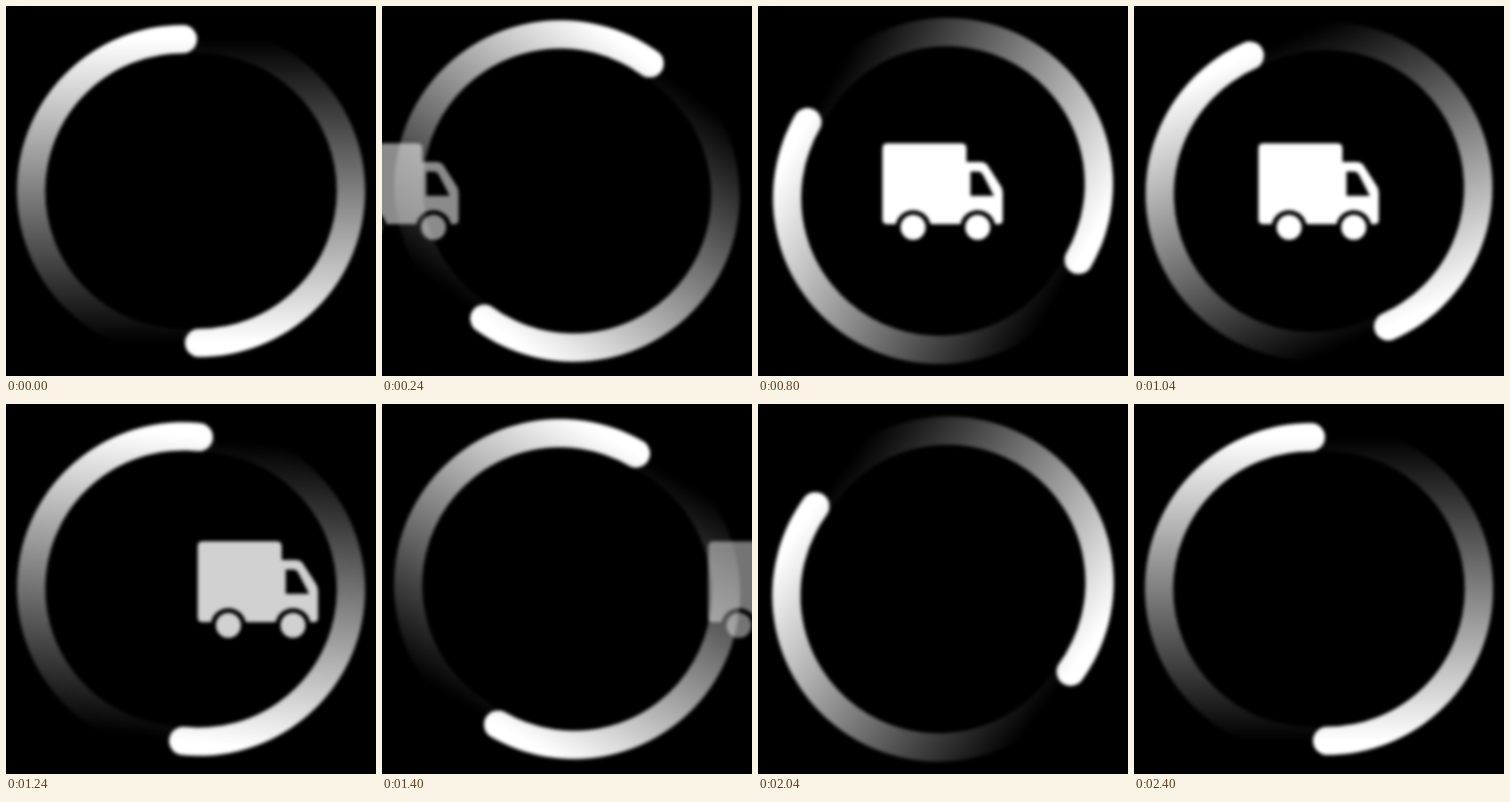
Animation of 458x458 px, one loop 2.44 s. Source, as an HTML page:

```html
<!DOCTYPE html>
<html lang="en">
<head>
<meta charset="utf-8">
<title>Delivery loader</title>
<style>
  html, body { margin: 0; height: 100%; overflow: hidden; background: #000; }
  svg { display: block; width: 100vw; height: 100vh; }
</style>
</head>
<body>
<svg viewBox="0 0 458 458">
  <defs>
    <linearGradient id="fade" gradientUnits="userSpaceOnUse" x1="0" y1="41" x2="0" y2="417">
      <stop stop-color="#fff"/>
      <stop offset="1" stop-color="#fff" stop-opacity="0"/>
    </linearGradient>
    <filter id="soft"><feGaussianBlur stdDeviation="2.3"/></filter>
    <path id="arc" d="M219 41A188 188 0 0 0 219 417" fill="none" stroke="url(#fade)" stroke-width="35" stroke-linecap="round"/>
  </defs>
  <g id="ring">
    <g filter="url(#soft)">
      <use href="#arc"/>
      <use href="#arc" transform="rotate(180 229 229)"/>
    </g>
  </g>
  <g id="truck" fill="#fff" filter="url(#soft)">
    <path fill-rule="evenodd" d="M160 170H252Q258 170 258 176V193H275Q281 193 284 197L300 222Q303 226 303 231V265Q303 270 298 270H293.500A22 22 0 0 0 250.500 270H213.500A22 22 0 0 0 170.500 270H160Q154 270 154 264V176Q154 170 160 170Z
      M263 205V235H292L278 208Q276 205 273 205Z"/>
    <circle cx="192" cy="274" r="15.500"/>
    <circle cx="272" cy="274" r="15.500"/>
  </g>
</svg>
<script>
  const STEP = 40, LOOP = 2440, STAGE = 458, SLIDE = 440, LEAVE = 1160;
  const ring = document.getElementById('ring');
  const truck = document.getElementById('truck');
  const clamp = v => Math.max(0, Math.min(1, v));

  function draw(now) {
    const t = Math.floor(now % LOOP / STEP) * STEP;
    ring.setAttribute('transform', `rotate(${t * 0.15} 229 229)`);

    // -1 is off to the left, 0 is parked, 1 is off to the right
    const shift = clamp(t / SLIDE) - 1 + clamp((t - LEAVE) / SLIDE);
    truck.setAttribute('transform', `translate(${shift * STAGE})`);
    truck.setAttribute('opacity', 1 - Math.abs(shift));
  }

  const start = performance.now();
  function tick() {
    draw(performance.now() - start);
    requestAnimationFrame(tick);
  }
  tick();
</script>
</body>
</html>
```
